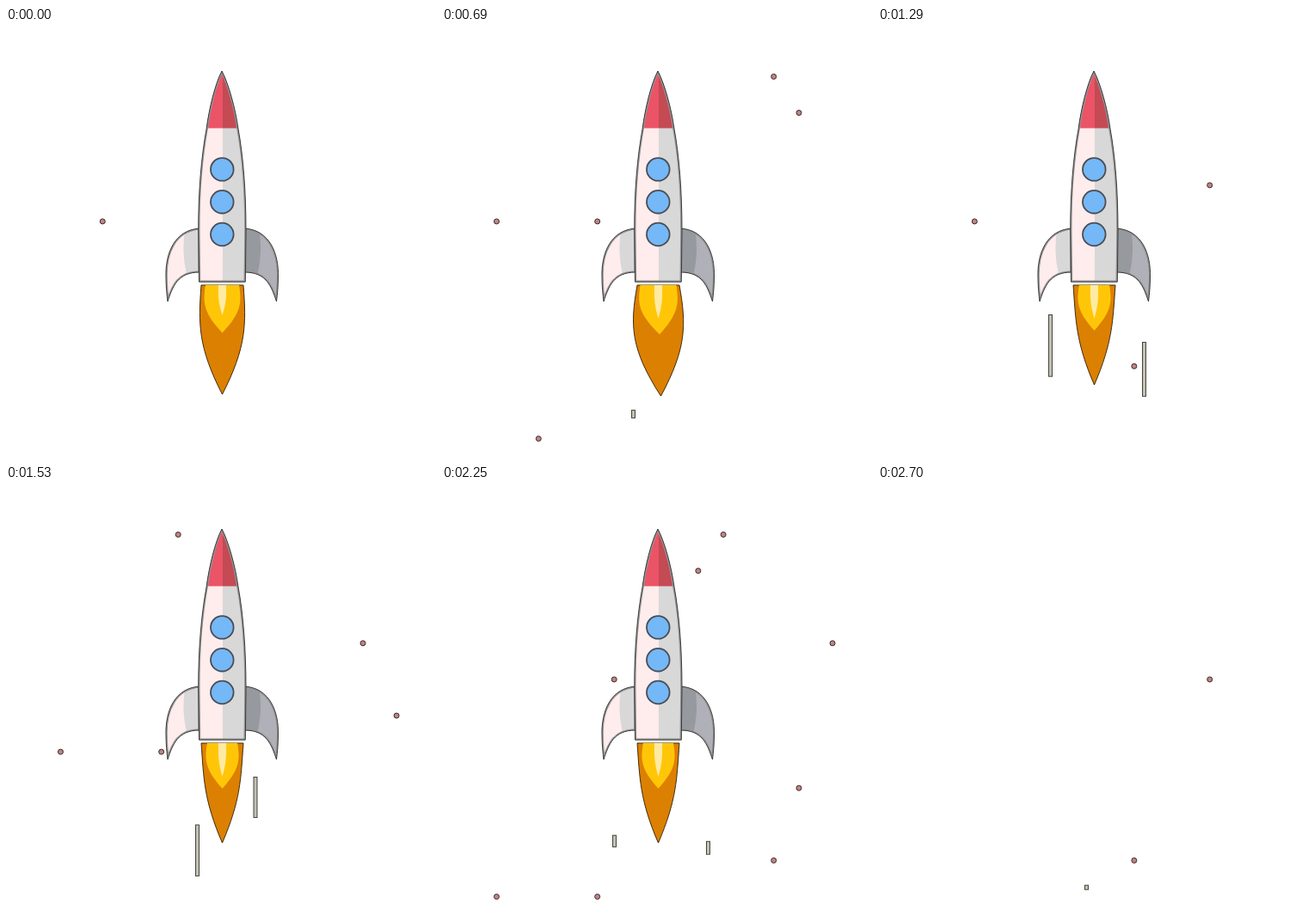
Write an HTML page with a canvas that moves like this. It is 500 by 500 pixels and loops after 2730 ms.

```html
<!DOCTYPE html>
<html lang="en">
<head>
<meta charset="utf-8">
<title>Rocket</title>
<style>
  html, body { margin: 0; width: 100%; height: 100%; overflow: hidden; background: #fff; }
  canvas { display: block; }
</style>
</head>
<body>
<canvas id="stage" width="500" height="500"></canvas>
<script>
const ctx = document.getElementById('stage').getContext('2d');
const STEP_MS = 30, STEPS = 91, AXIS = 251.5;

// The same shower of stars [column, delay] is launched at each of these steps
const launches = [-5, 12, 38, 58];
const shower = [[11, 0], [6, 6], [18, 6], [42, 9], [20, 12], [30, 15], [33, 16], [30, 22], [39, 27], [46, 33]];
const COLUMN = 500 / 51.2, ROWS = 12, ROW_TOP = 14.4, ROW_GAP = 42.1;

// Lanes in which speed lines return
const lanes = [
  { x: 290, first: 3, every: 44 },
  { x: 309.5, first: 6, every: 29 },
  { x: 222.5, first: 12, every: 33 },
  { x: 242.5, first: 27, every: 26 },
  { x: 200.5, first: 38, every: 26 },
  { x: 192.5, first: 58, every: 32 }
];
const GROW_STEPS = 6;

// The flame flickers through these poses
const flames = [
  { lean: 0, length: 127, bulge: 3.5 },
  { lean: 0, length: 116, bulge: -3 },
  { lean: 4, length: 151, bulge: -3.6 },
  { lean: 3, length: 129, bulge: 8.3 }
];

const path = d => new Path2D(d);
const body = path('M251 50C243 65 236 95 233.3 116C227 150 223.7 190 223.7 235L224.5 295.2H278.3L279 235C279 190 276 150 269.8 116C267 95 259 65 251 50Z');
const fin = path('M225 233C196 235 185 262 186 290C186 300 187 310 188 318C194 300 200 284 225 284Z');
const finShade = path('M209 230Q203 260 211 290H230V230Z');

function fill(shape, color) {
  ctx.fillStyle = color;
  ctx.fill(shape);
}

function stroke(shape, color, width) {
  ctx.strokeStyle = color;
  ctx.lineWidth = width;
  ctx.stroke(shape);
}

function rect(color, x, y, w, h) {
  ctx.fillStyle = color;
  ctx.fillRect(x, y, w, h);
}

function disc(x, y, r, color, edge, width) {
  const circle = new Path2D();
  circle.arc(x, y, r, 0, 2 * Math.PI);
  fill(circle, color);
  stroke(circle, edge, width);
}

// Fills a shape, adds its shading, a soft inner edge and a thin outer edge
function panel(shape, color, shade) {
  ctx.save();
  ctx.clip(shape);
  fill(shape, color);
  shade();
  stroke(shape, '#949494', 3.6);
  ctx.restore();
  stroke(shape, '#2c2c2c', 0.9);
}

function drawStars(n) {
  for (const launch of launches) {
    for (const [column, delay] of shower) {
      const row = n - launch - delay;
      if (row < 0 || row >= ROWS) continue;
      disc((column + 0.5) * COLUMN, ROW_TOP + row * ROW_GAP, 3, '#c08484', '#3c2a2a', 1);
    }
  }
}

// A line grows downwards, then its tail catches up; near the flame it starts lower
function drawSpeedLines(n) {
  for (const { x, first, every } of lanes) {
    const k = n < first ? 0 : (n - first) % every;
    if (k === 0 || k >= 2 * GROW_STEPS) continue;
    const distance = Math.abs(x - AXIS);
    const top = Math.max(333, 435 - 0.0017 * distance ** 3);
    const length = 25 + 1.22 * distance;
    const head = top + length * Math.min(1, k / GROW_STEPS);
    const tail = top + length * Math.max(0, k / GROW_STEPS - 1);
    rect('#454540', x - 2.5, tail, 5, head - tail);
    rect('#c4c2b4', x - 1.5, tail + 1, 3, head - tail - 2);
  }
}

function tongue(half, bulge, lean, length) {
  const top = 299, l = AXIS - half, r = AXIS + half;
  const y1 = top + 0.36 * length, y2 = top + 0.57 * length;
  return path(`M${l} ${top}C${l - bulge} ${y1} ${l - bulge} ${y2} ${AXIS + lean} ${top + length}
    C${r + bulge} ${y2} ${r + bulge} ${y1} ${r} ${top}Z`);
}

function drawFlame(n) {
  const { lean, length, bulge } = flames[(n >> 1) % flames.length];
  const outer = tongue(24.5, bulge, lean, length);
  fill(outer, '#dc8002');
  stroke(outer, '#2c1c00', 0.9);
  fill(tongue(18.5 + 0.3 * bulge, 3, lean / 2, 54 + 0.4 * bulge), '#ffc608');
  fill(tongue(4.5, 0.3, 0, n % 2 ? 39 : 35), '#ffeaa4');
}

function drawFin(color, shadeColor) {
  panel(fin, color, () => fill(finShade, shadeColor));
}

function drawRocket() {
  drawFin('#ffecec', '#d8d8d8');
  ctx.save();
  ctx.translate(2 * AXIS - 0.5, 0);
  ctx.scale(-1, 1);
  drawFin('#b0b0b8', '#96999e');
  ctx.restore();
  panel(body, '#ffecec', () => {
    rect('#d8d8d8', 252, 40, 40, 260);
    rect('#ea5466', 220, 40, 32, 76.5);
    rect('#c44a54', 252, 40, 32, 76.5);
  });
  for (let i = 0; i < 3; i++) disc(251.3, 164.4 + 37.8 * i, 13.3, '#74b8f8', '#4a4c52', 1.8);
}

function draw(time) {
  const n = Math.floor(time / STEP_MS) % STEPS;
  rect('#fff', 0, 0, 500, 500);
  drawStars(n);
  drawSpeedLines(n);
  // The rocket blinks out on the last step of the loop
  if (n < STEPS - 1) {
    drawFlame(n);
    drawRocket();
  }
  requestAnimationFrame(draw);
}

draw(0);
</script>
</body>
</html>
```
